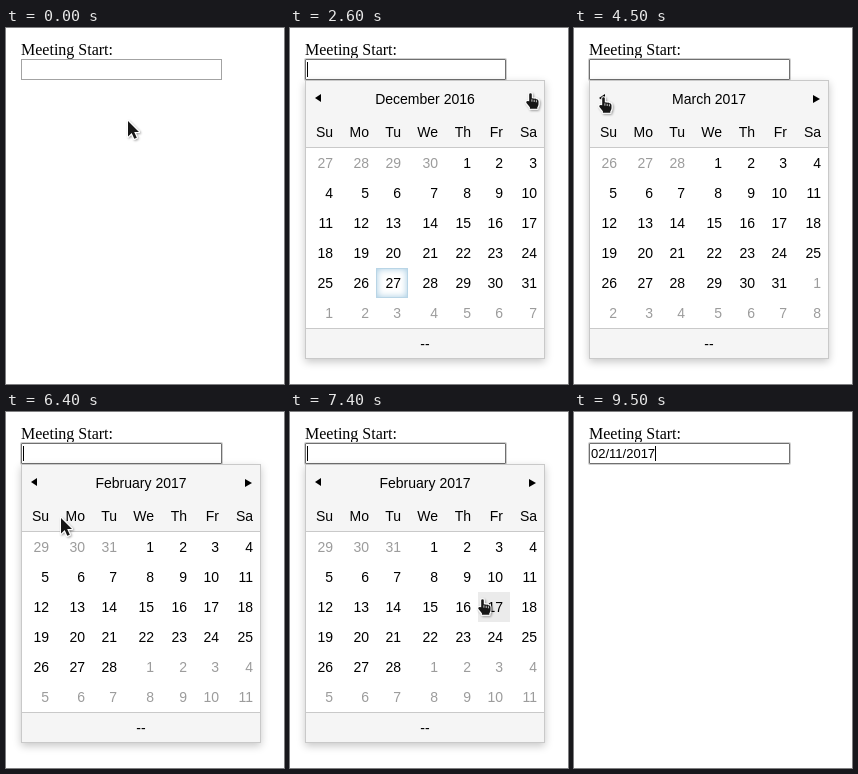
These frames come from a looping animation (278 px wide and 356 px high, 9800 ms). An HTML page:

```html
<!DOCTYPE html>
<html lang="en">
<head>
<meta charset="utf-8">
<title>Date picker</title>
<style>
  html, body { margin: 0; width: 100%; height: 100%; overflow: hidden; background: #fff; }
  #stage { position: relative; width: 278px; height: 356px; overflow: hidden;
    font: 14px/30px "Liberation Sans", Arial, sans-serif; color: #000; cursor: default; }
  #stage div { position: absolute; box-sizing: border-box; white-space: pre; }
  #label { left: 15px; top: 12px; font: 16px/20px "Liberation Serif", "Times New Roman", serif; }
  #field { left: 15px; top: 31px; width: 201px; height: 21px; border: 1px solid #a3a3a3; background: #fff; }
  #field.focus { border-color: #707070; border-radius: 1px; box-shadow: 0 0 0 1px #cfcfcf; }
  #value { left: 17px; top: 34px; font-size: 13px; line-height: 15px; }
  #caret { top: 34px; width: 1px; height: 15px; background: #000; }
  #popup { left: 0; top: 0; width: 278px; height: 356px; }
  #panel { left: 15px; top: 52px; width: 240px; height: 279px; background: #fff;
    border: 1px solid #c9c9c9; box-shadow: 0 3px 8px rgba(0, 0, 0, .22); }
  #head, #foot { left: 16px; width: 238px; background: #f5f5f5; text-align: center; }
  #head { top: 53px; height: 67px; border-bottom: 1px solid #c9c9c9; }
  #foot { top: 300px; height: 30px; border-top: 1px solid #c9c9c9; }
  #title { left: 50px; top: 56px; width: 170px; text-align: center; }
  .cell { height: 30px; padding-right: 7px; text-align: right; }
  .other { color: #9c9c9c; }
  .today { box-shadow: inset 0 0 0 1px #b9d5e6, inset 0 0 7px 1px #a5cbe2; }
  .hover { background: #ebebeb; }
  svg { position: absolute; left: 0; top: 0; }
</style>
</head>
<body>
<div id="stage">
  <div id="label">Meeting Start:</div>
  <div id="field"></div>
  <div id="value">02/11/2017</div>
  <div id="caret"></div>
  <div id="popup">
    <div id="panel"></div>
    <div id="head"></div>
    <div id="title"></div>
    <div id="foot">--</div>
    <svg width="278" height="356">
      <path d="M25 70l6-4v8zM246 71l-7-4v8z"/>
    </svg>
  </div>
  <svg width="278" height="356">
    <defs>
      <filter id="shade" x="-50%" y="-50%" width="200%" height="200%">
        <feDropShadow dx="1" dy="1" stdDeviation="1" flood-opacity=".4"/>
      </filter>
    </defs>
    <g id="pointer" filter="url(#shade)" fill="#161616" stroke="#fff" stroke-width="2" stroke-linejoin="round">
      <path id="arrow" paint-order="stroke" d="M0 0V15.5L3.7 12L6.3 17.8L8.8 16.7L6.2 11H11Z"/>
      <g id="hand" transform="translate(-.5 .3)">
        <path paint-order="stroke" d="M-1.3 8V1.2Q-1.3 0 0 0T1.3 1.2V5.2Q2.8 4.4 3.6 5.5Q5 4.8 5.8 6Q8 5.8 8 8V11Q7.8 13 6.8 14V15.5H-.6V14L-4.2 9.5Q-4.6 7.6-2.9 7.6Z"/>
        <path stroke-width=".8" d="M1.4 6v2.4M3.7 6.5v2.2M5.9 7v2"/>
      </g>
      <g id="beam" fill="none">
        <path stroke-width="3" d="M-3 -6.5H3M0 -6.5V6.5M-3 6.5H3"/>
        <path stroke="#111" stroke-width="1.1" d="M-3 -6.5H-.8M.8 -6.5H3M0 -6V6M-3 6.5H-.8M.8 6.5H3"/>
      </g>
    </g>
  </svg>
</div>
<script>
const LOOP = 9800, STEP = 100, OPEN = 1100, CLOSE = 8300, HIDE = 9300, BLINK = 600;
const $ = id => document.getElementById(id);
const edges = [16, 50, 86, 118, 155, 188, 220, 254];

// Each stroke of the pointer starts where the last one ended and curves towards "bend".
const rest = [122, 93];
const strokes = [
  { from: 100, to: 700, bend: [105, 68], end: [97, 49] },
  { from: 1600, to: 2600, bend: [170, 205], end: [241, 65] },
  { from: 3600, to: 4400, bend: [140, 92], end: [30, 69] },
  { from: 6300, to: 7000, bend: [75, 140], end: [135, 201] },
  { from: 7000, to: 8100, bend: [180, 208], end: [238, 153] }
];
const nextClicks = [2700, 2900, 3000, 3100];
const backClicks = [4500, 4700];

function addCell(col, top, text = "") {
  const cell = document.createElement("div");
  cell.className = "cell";
  cell.textContent = text;
  cell.style.left = edges[col] + "px";
  cell.style.top = top + "px";
  cell.style.width = edges[col + 1] - edges[col] + "px";
  $("popup").append(cell);
  return cell;
}

["Su", "Mo", "Tu", "We", "Th", "Fr", "Sa"].forEach((day, i) => addCell(i, 89, day));
const cells = Array.from({ length: 42 }, (_, i) => addCell(i % 7, 120 + 30 * Math.floor(i / 7)));

const easeOut = u => 1 - (1 - u) ** 2;

function pointerAt(t) {
  let pos = rest;
  for (const { from, to, bend, end } of strokes) {
    if (t <= from) break;
    const k = easeOut(Math.min(1, (t - from) / (to - from)));
    pos = pos.map((p, i) => (1 - k) ** 2 * p + 2 * k * (1 - k) * bend[i] + k * k * end[i]);
  }
  return pos;
}

function pointerKind(x, y, open) {
  if (y > 31 && y < 52 && x > 15 && x < 216) return "beam";
  if (!open) return "arrow";
  if (y >= 120 && y < 300) return "hand";
  const onButton = x < 45 || x > 225 || (x > 60 && x < 210);
  return y > 55 && y < 88 && onButton ? "hand" : "arrow";
}

function monthAt(t) {
  const count = clicks => clicks.filter(c => c <= t).length;
  return new Date(2016, 11 + count(nextClicks) - count(backClicks), 1);
}

function hoveredCell(x, y) {
  if (y < 120 || y >= 300) return -1;
  return Math.floor((y - 120) / 30) * 7 + edges.findIndex(e => e > x) - 1;
}

function drawMonth(first, hovered) {
  const year = first.getFullYear(), month = first.getMonth();
  // the grid always begins with at least one day of the previous month
  const lead = new Date(year, month, 0).getDay();
  $("title").textContent = first.toLocaleString("en-US", { month: "long" }) + " " + year;
  cells.forEach((cell, i) => {
    const date = new Date(year, month, i - lead);
    const toggle = (name, on) => cell.classList.toggle(name, on);
    toggle("other", date.getMonth() !== month);
    toggle("today", date.getMonth() === 11 && date.getDate() === 27);
    toggle("hover", i === hovered);
    cell.textContent = date.getDate();
  });
}

const show = (id, on) => { $(id).style.display = on ? "" : "none"; };

function render(t) {
  const done = t >= CLOSE;
  const open = t >= OPEN && !done;
  const [x, y] = pointerAt(t);
  const kind = pointerKind(x, y, open);

  $("field").className = t >= OPEN ? "focus" : "";
  show("value", done);
  show("popup", open);
  show("caret", t >= OPEN && Math.floor((t - OPEN) / BLINK) % 2 === 0);
  $("caret").style.left = (done ? 81 : 17) + "px";
  if (open) drawMonth(monthAt(t), hoveredCell(x, y));

  show("pointer", t < HIDE);
  for (const id of ["arrow", "hand", "beam"]) show(id, id === kind);
  $("pointer").setAttribute("transform", `translate(${Math.round(x)} ${Math.round(y)})`);
}

const start = performance.now();
function tick() {
  const t = (performance.now() - start) % LOOP;
  render(Math.floor(t / STEP) * STEP);
  requestAnimationFrame(tick);
}
tick();
</script>
</body>
</html>
```
